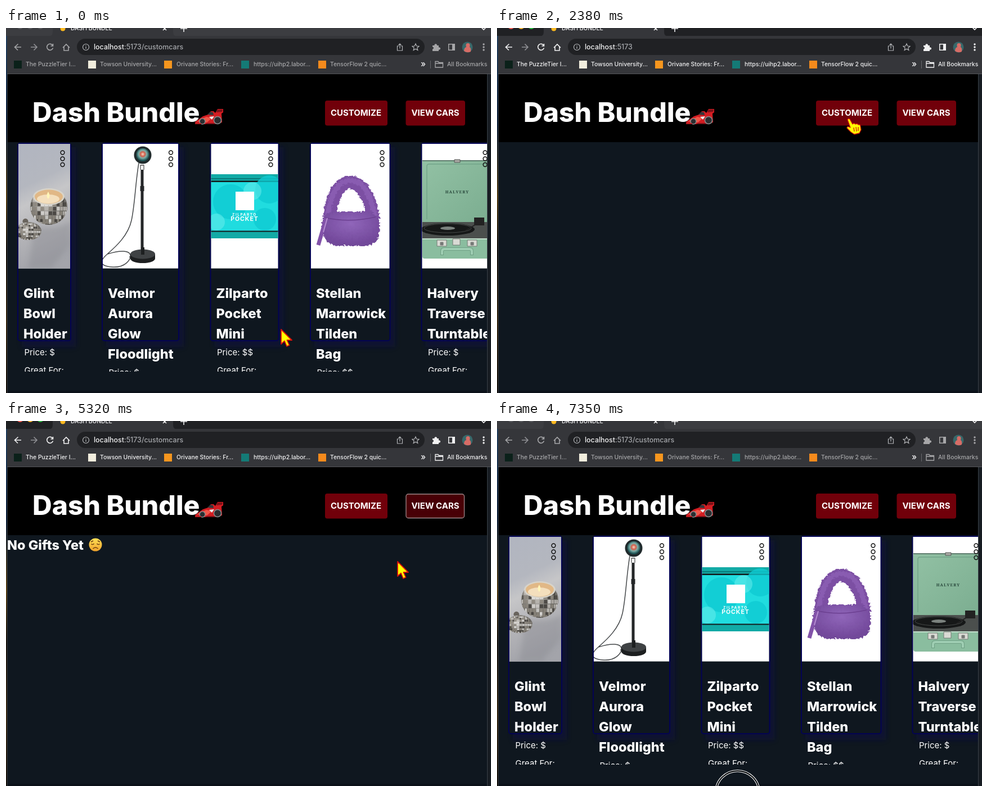
Write an HTML page that moves like this. It is 862 by 649 pixels and loops after 7420 ms.

```html
<!DOCTYPE html>
<html lang="en">
<head>
<meta charset="utf-8">
<title>Gift browser</title>
<style>
html, body { margin: 0; width: 100%; height: 100%; overflow: hidden; background: #0f171f; }
svg { display: block; width: 862px; height: 649px; }
text { white-space: pre; }
.ui { font: 500 10.4px Inter, sans-serif; fill: #f1f1f2; }
.url { font-size: 12.4px; }
.head { font: 800 23.5px Inter, sans-serif; fill: #fff; }
.title { font-size: 48px; }
.button { font: 700 15px Inter, sans-serif; fill: #fff; text-anchor: middle; }
.body { font: 15px Inter, sans-serif; fill: #fff; }
.line { fill: none; stroke: #f1f1f2; stroke-width: 1.6; }
.mid { text-anchor: middle; }
</style>
</head>
<body>
<svg id="stage" viewBox="0 0 862 649">
  <defs>
    <clipPath id="pageClip"><rect x="2" y="82" width="853" height="567"/></clipPath>
    <clipPath id="listClip"><rect x="2" y="203" width="853" height="408"/></clipPath>
    <filter id="blur" x="-30%" y="-10%" width="160%" height="120%"><feGaussianBlur stdDeviation="4"/></filter>
    <filter id="fuzz">
      <feTurbulence baseFrequency=".16" numOctaves="2" seed="4"/>
      <feDisplacementMap in="SourceGraphic" scale="6" xChannelSelector="R" yChannelSelector="G"/>
    </filter>
    <linearGradient id="desk" x2="0" y2="1">
      <stop stop-color="#24405f"/><stop offset=".25" stop-color="#10223c"/>
      <stop offset=".45" stop-color="#5a4216"/><stop offset=".6" stop-color="#171310"/>
      <stop offset=".8" stop-color="#3a2a14"/><stop offset="1" stop-color="#15110e"/>
    </linearGradient>
    <linearGradient id="wall" x2=".2" y2="1">
      <stop stop-color="#b1b5c0"/><stop offset=".35" stop-color="#b4b7bf"/>
      <stop offset=".5" stop-color="#c6c6c8"/><stop offset=".75" stop-color="#b3b3b7"/><stop offset="1" stop-color="#a3a4aa"/>
    </linearGradient>
    <radialGradient id="ball" cx=".4" cy=".35"><stop stop-color="#d9d7d2"/><stop offset="1" stop-color="#66645f"/></radialGradient>
    <radialGradient id="lens" cx=".5" cy=".45">
      <stop stop-color="#f6d9c4"/><stop offset=".35" stop-color="#d3604c"/>
      <stop offset=".6" stop-color="#7fb0aa"/><stop offset="1" stop-color="#1d5152"/>
    </radialGradient>
    <radialGradient id="fur" cx=".5" cy=".35" r=".6"><stop stop-color="#9066ba"/><stop offset="1" stop-color="#72489a"/></radialGradient>
    <linearGradient id="lid" x2="1" y2="1"><stop stop-color="#92c1a4"/><stop offset="1" stop-color="#7aac8f"/></linearGradient>
    <linearGradient id="face" x2="0" y2="1"><stop stop-color="#ffdf55"/><stop offset="1" stop-color="#f0a32c"/></linearGradient>
  </defs>

  <g id="browser">
    <rect id="frame" width="862" height="15"/>
    <path d="M75 15Q83 15 83 7V0H297V7Q297 15 305 15Z" fill="#35363a"/>
    <g id="lights"><circle cx="25" cy="-4" r="6"/><circle cx="43" cy="-4" r="6"/><circle cx="61" cy="-4" r="6"/></g>
    <circle cx="101" cy="1" r="4.5" fill="#ffb91f"/>
    <text class="ui" x="115" y="4">DASH BUNDLE</text>
    <path class="line" d="M279-2l6 6m0-6l-6 6M310 1h12m-6-6v12M845-1l4 4 4-4"/>
    <rect y="14" width="862" height="67" fill="#35363a"/>
    <rect x="126" y="19" width="618" height="29" rx="14.5" fill="#202124"/>
    <g class="dim">
      <path class="line" d="M27 34H16m5.500-5.500L15.500 34l5.500 5.500M83 31a5.500 5.500 0 1 0 .5 4.500M83.500 28v4h-4M101 35l6-6 6 6m-10-1.500V40h8v-6.500"/>
      <path d="M758 31h3.500a2.300 2.300 0 1 1 4.500 0h3v3.500a2.200 2.200 0 1 1 0 4V41h-11v-3.500a2 2 0 1 0 0-4z" fill="#f1f1f2"/>
      <path d="M786 28h12v12h-12zM787.500 29.500v9h5.500v-9z" fill="#f1f1f2" fill-rule="evenodd"/>
      <g fill="#f1f1f2"><circle cx="849" cy="29" r="1.700"/><circle cx="849" cy="34" r="1.700"/><circle cx="849" cy="39" r="1.700"/></g>
    </g>
    <path class="line" style="stroke:#909195" d="M44 34h11m-5.500-5.500l5.500 5.500-5.500 5.500"/>
    <g class="line" style="stroke:#b4b6b9;stroke-width:1.200">
      <circle cx="142" cy="34" r="5.500"/><path d="M142 33v4m0-6.500v1.200"/>
      <path d="M698 32h-2.500v8h9v-8H702m-2 4.500v-8.500m-2.500 2.500l2.500-2.500 2.500 2.500"/>
      <path d="M728 28l1.800 4 4.200.4-3.200 2.900 1 4.300-3.800-2.300-3.800 2.300 1-4.300-3.200-2.900 4.200-.4z"/>
    </g>
    <circle cx="820" cy="34" r="9.500" fill="#37686a"/>
    <path d="M814 41q0-6 4-7-2-7 3-7t3 7q3 1 2 8-6 3-12-1z" fill="#d76c66"/>
    <text class="ui url" x="156" y="38">localhost<tspan fill="#a6a8ac">:5173<tspan id="path">/customcars</tspan></tspan></text>
    <g id="bookmarks"></g>
    <rect y="81" width="862" height="1" fill="#54565a"/>
  </g>

  <rect y="82" width="862" height="567" fill="#0f171f"/>
  <rect x="2" y="82" width="853" height="121"/>
  <rect y="645" width="862" height="4" fill="#0b1119"/>
  <text class="head title" x="47" y="167">Dash Bundle</text>
  <g id="car">
    <path d="M336 167l14-10 9-3 5-6h5l3 3 4-7 10 0v6l-3 2 1 16-21 3h-26z" fill="#d31d22"/>
    <path d="M339 166l17-8 10 2-9 8z" fill="#f05649"/>
    <path d="M375 145l10 0-1 4-10 1zM357 169l16 0v2h-19z" fill="#7d1118"/>
    <path d="M358 154l5-5 5 1 1 5z" fill="#33363b"/><path d="M361 158l9-1-4 6z" fill="#eee"/>
    <g fill="#2b2d30" stroke="#898c8d" stroke-width="1.500"><circle cx="349" cy="166" r="5"/><circle cx="376" cy="164" r="6.500"/></g>
    <path d="M336 170h11" stroke="#b51c20" stroke-width="2"/>
  </g>
  <rect x="567" y="129" width="111" height="44.500" rx="4" fill="#71000a"/>
  <text class="button" x="622" y="156">CUSTOMIZE</text>
  <rect id="view" rx="4"/>
  <text class="button" x="763" y="156">VIEW CARS</text>

  <g id="empty">
    <text class="head" x="2" y="229">No Gifts Yet</text>
    <circle cx="159" cy="220" r="11.500" fill="url(#face)"/>
    <g fill="none" stroke="#6d3d12" stroke-width="1.400">
      <path d="M151.500 218.500q2.500 2.500 5-.5m5 0q2.500 3 5 .5M154.500 227q4.500-4.500 9 0M151 215l4-2m12 2l-4-2"/>
    </g>
  </g>
  <g clip-path="url(#pageClip)"><g id="cards" clip-path="url(#listClip)"></g></g>

  <rect width="2" y="14" height="635" fill="url(#desk)"/>
  <rect x="2" y="82" width="1" height="567" fill="#2b3036"/>
  <rect x="855" y="82" width="1" height="567" fill="#394047"/>
  <rect x="856" y="82" width="6" height="567" fill="#171c22"/>

  <g id="ring" fill="none" stroke="#fff" stroke-width="1.100">
    <circle r="38.300" stroke="#000" stroke-width="3" opacity=".7"/><circle r="40"/><circle r="36.800"/>
  </g>
  <g id="pointer" stroke="#d6100c" stroke-linejoin="round">
    <path id="arrow" d="M1 1V27L7 21.500 11 31 15.500 29 11.500 20H20Z" fill="#ff0" stroke-width="1.800"/>
    <g id="hand" fill="#ff0" stroke-width="1.300">
      <path d="M-5 2Q-4-1-1 1L4 10q2-3 5 0 3-2 5 1 4-1 4 3l1 6-3 6-9 2-6-4-7-7q0-4 4-2l2 1z"/>
      <path d="M6 16l1 7m3-8l1 8m3-8v7" fill="none"/>
    </g>
  </g>
</svg>
<script>
const $ = id => document.getElementById(id);
const LOOP = 7420, STEP = 70;

let seed = 7;
const random = () => (seed = seed * 16807 % 2147483647) / 2147483647;

const bookmarks = [
  [14, 35, '#0b211a', 'The PuzzleTier I...'], [146, 167, '#f1eddd', 'Towson University...'],
  [281, 303, '#f6961e', 'Orivane Stories: Fr...'], [418, 440, '#147a76', 'https://uihp2.labor...'],
  [555, 576, '#f58a1c', 'TensorFlow 2 quic...']
];
$('bookmarks').innerHTML = bookmarks.map(([x, textX, color, label]) =>
  `<rect x="${x}" y="58" width="14" height="14" fill="${color}"/>
   <text class="ui dim" x="${textX}" y="68">${label}</text>`).join('') +
  `<text class="ui" x="737" y="69" font-weight="700" style="font-size:15px">»</text>
   <rect x="754" y="58" width="1" height="14" fill="#686a6e"/>
   <g class="dim"><path class="line" style="stroke-width:1.300" d="M763 70V59.500h5l1.500 2h7V70zM763 63h13"/>
   <text class="ui" x="784" y="68">All Bookmarks</text></g>`;

// A mirror ball: facets in rows that narrow towards the rim.
function mirrorBall(id, cx, cy, rx, ry) {
  let out = '';
  for (let row = -6; row <= 6; row++) {
    const v = Math.sin(row * 0.25), half = rx * Math.sqrt(1 - v * v);
    for (let col = -7; col < 7; col++) {
      const left = half * Math.sin(col * 0.224), width = half * Math.sin((col + 1) * 0.224) - left;
      const shade = random(), light = shade < 0.2 ? 25 : shade < 0.7 ? 52 : 68 + random() * 24;
      out += `<rect x="${cx + left}" y="${cy + v * ry}" width="${width * .85}" height="${ry * .21}" fill="hsl(35 6% ${light}%)"/>`;
    }
  }
  const shape = `<ellipse cx="${cx}" cy="${cy}" rx="${rx}" ry="${ry}" fill="url(#ball)"/>`;
  return `<clipPath id="${id}">${shape}</clipPath>${shape}<g clip-path="url(#${id})" opacity=".85">${out}</g>`;
}

const candle = () => `
  <rect x="22" y="206" width="92" height="222" fill="url(#wall)"/>
  <path d="M50 352Q90 360 114 345V385L80 428H40Z" fill="#8a8b92" opacity=".4" filter="url(#blur)"/>
  ${mirrorBall('bowl', 76, 318, 33, 32)}
  <ellipse cx="76" cy="300" rx="28" ry="15" fill="#d8d4ca"/>
  <ellipse cx="76" cy="300" rx="25" ry="12.500" fill="#e1b886"/>
  <ellipse cx="75" cy="304" rx="20" ry="8" fill="#f4dfbd"/>
  <path d="M75 291q5 8 0 13-5-5 0-13z" fill="#fff5b8"/>
  ${mirrorBall('cap', 40, 361, 23, 16)}
  <path d="M30 346a5 5 0 1 1 9 0z" fill="#69645d"/>`;

const lamp = () => `
  <path d="M236 240C230 275 229 315 223 342S196 388 180 402 168 424 190 425 222 412 221 404 205 394 180 402M219 407l8 1" fill="none" stroke="#45484a" stroke-width="1.500"/>
  <path d="M239.500 252h5V400h-5zM238.500 281h7v9h-7z" fill="#242628"/>
  <path d="M239 252v-8h6v8" fill="none" stroke="#555" stroke-width="1.300"/>
  <path d="M221 402v8a22 8 0 0 0 44 0v-8z" fill="#1d1f20"/><ellipse cx="243" cy="402" rx="22" ry="8.500" fill="#3f4244"/>
  <path d="M240 390h6v13h-6z" fill="#1d1f20"/>
  <circle cx="243" cy="226" r="15.500" fill="#202a2c"/><circle cx="243" cy="225.500" r="11.500" fill="url(#lens)"/>`;

const consoleBox = () => `
  <rect x="364" y="260" width="120" height="114" fill="#12aaa6"/>
  <rect x="364" y="267" width="120" height="2" fill="#087a79"/>
  <rect x="364" y="271.500" width="120" height="91" fill="#121b1c"/>
  <rect x="364" y="274" width="120" height="86.500" fill="#20dcdf"/>
  <g fill="#0fcbd3" opacity=".8"><circle cx="399" cy="309" r="31"/><circle cx="468" cy="287" r="25"/><circle cx="460" cy="340" r="20"/></g>
  <g fill="#6eeeee" opacity=".5"><circle cx="374" cy="345" r="15"/><circle cx="438" cy="290" r="16"/></g>
  <rect x="408" y="291" width="33" height="33" fill="#fff"/>
  <g fill="#fff" font-family="Inter, sans-serif" font-weight="700" class="mid">
    <text x="424" y="334" font-size="6.500" letter-spacing="1.500">ZILPARTO</text>
    <text x="424" y="343" font-size="10.500" letter-spacing="1">POCKET</text>
  </g>`;

const bag = () => `
  <g filter="url(#fuzz)">
    <path d="M573 342C576 302 588 273 609 273S645 296 652 338" fill="none" stroke="#7b4fa3" stroke-width="23"/>
    <path d="M570 336C574 300 586 270 610 270S647 296 654 332" fill="none" stroke="#8d60b6" stroke-width="9" opacity=".8"/>
    <path d="M560 350Q559 326 582 325H642Q664 328 663 355 662 386 634 386H588Q561 384 560 350Z" fill="url(#fur)"/>
  </g>
  <path d="M566 337Q610 347 657 336" fill="none" stroke="#6b3f90" stroke-width="1.500"/>
  <path d="M569 338L555 386" stroke="#8252a9" stroke-width="7"/><path d="M571 338l-7 25" stroke="#b48dd0" stroke-width="2"/>`;

const turntable = () => `
  <rect x="740" y="235" width="125" height="118" rx="4" fill="url(#lid)"/>
  <path d="M748 340V246q0-4 4-4h110" fill="none" stroke="#73a58a" stroke-width="1.500"/>
  <path d="M740 236h122" stroke="#5f7d6e" stroke-width="2"/>
  <path d="M797 239v-5h10v5z" fill="#a9a9a4" stroke="#555"/>
  <text class="mid" x="802" y="294" font-family="Noto Serif, serif" font-weight="800" font-size="7" letter-spacing="1.200" fill="#29483c">HALVERY</text>
  <path d="M740 345h122v30H740z" fill="#4b4f4d"/>
  <ellipse cx="785" cy="358" rx="48" ry="11" fill="#161818"/><ellipse cx="785" cy="356" rx="42" ry="8" fill="none" stroke="#454847"/>
  <ellipse cx="785" cy="356" rx="13" ry="3" fill="#7b827e"/>
  <path d="M833 338h16v12h-16zM837 348l-20 12" fill="#222" stroke="#222" stroke-width="2"/>
  <path d="M740 374h122v32q0 4-4 4H744q-4 0-4-4z" fill="#8abd9f"/>
  <path d="M740 375h122" stroke="#c0decb" stroke-width="2"/>
  <g fill="#d9dad4" stroke="#747a74"><path d="M766 377h17v11h-17zM820 377h17v11h-17zM794 375h13v11h-13z"/><path d="M772 381h5v5h-5zM826 381h5v5h-5z" fill="#777"/></g>
  <path d="M775 404v-7q0-4 4-4h45q4 0 4 4v7" fill="none" stroke="#6e9f84" stroke-width="6"/>
  <path d="M775 403v-6q0-4 4-4h45q4 0 4 4v6" fill="none" stroke="#9fceb3" stroke-width="4"/>`;

const gifts = [
  { x: 20, width: 96, dots: 100.5, price: '$', name: 'Glint Bowl Holder', photo: candle },
  { x: 170, width: 138, dots: 293, price: '$', name: 'Velmor Aurora Glow Floodlight', photo: lamp },
  { x: 362.5, width: 123, dots: 470.5, price: '$$', name: 'Zilparto Pocket Mini', photo: consoleBox },
  { x: 540, width: 143.500, dots: 668.5, price: '$$', name: 'Stellan Marrowick Tilden Bag', photo: bag },
  { x: 737.5, width: 134, dots: 851.5, price: '$', name: 'Halvery Traverse Turntable', photo: turntable }
];

function card({ x, width, dots, price, name, photo }, index) {
  const words = name.split(' '), baseline = 582 + (words.length - 3) * 36;
  const inner = `x="${x + 2}" y="206" width="${width - 4}" height="221.500"`;
  return `<clipPath id="photo${index}"><rect ${inner}/></clipPath>
    <rect x="${x + 8}" y="212" width="${width}" height="355" fill="#0b1146" opacity=".5" filter="url(#blur)"/>
    <rect x="${x + 1}" y="205" width="${width - 2}" height="351" rx="4" fill="#0f171f" stroke="#030353" stroke-width="2"/>
    <rect ${inner} fill="#fff"/>
    <g clip-path="url(#photo${index})">${photo()}</g>
    <g fill="none" stroke="#111" stroke-width="1.500">${[221.5, 232.5, 243].map(y => `<circle cx="${dots}" cy="${y}" r="3.400"/>`).join('')}</g>
    ${words.map((word, i) => `<text class="head" x="${x + 11}" y="${480 + i * 36}">${word}</text>`).join('')}
    <text class="body" x="${x + 12.5}" y="${baseline}">Price: ${price}</text>
    <text class="body" x="${x + 12.5}" y="${baseline + 32}">Great For:</text>`;
}
$('cards').innerHTML = gifts.map(card).join('');

// Pointer stops: time, x, y.
const route = [
  [0, 488, 535], [280, 493, 513], [420, 493, 513], [560, 505, 480], [840, 600, 350], [1050, 664, 262],
  [1190, 675, 230], [1330, 637, 161], [1400, 633, 157], [1610, 633, 157], [1820, 628, 161],
  [2660, 628, 161], [2940, 602, 235], [3220, 562, 370], [3430, 551, 410], [3640, 551, 422],
  [3710, 551, 428], [3780, 551, 428], [4060, 600, 350], [4340, 705, 220], [4550, 752, 170],
  [4760, 756, 162], [5040, 756, 162], [5320, 695, 249], [5600, 600, 390], [5740, 566, 432],
  [5950, 561, 437], [6230, 561, 437], [6720, 500, 651], [7350, 431, 664], [LOOP, 431, 664]
];
const clicks = [1400, 2100, 4900, 7350];

function pointerAt(time) {
  const next = route.findIndex(stop => stop[0] > time);
  const [t0, x0, y0] = route[next - 1], [t1, x1, y1] = route[next];
  const part = (time - t0) / (t1 - t0);
  return [x0 + (x1 - x0) * part, y0 + (y1 - y0) * part];
}

const set = (node, values) => { for (const key in values) node.setAttribute(key, values[key]); };
const show = (id, visible) => $(id).style.display = visible ? '' : 'none';
const dimmed = document.querySelectorAll('.dim'), lights = [...$('lights').children];

function draw(time) {
  const active = time >= 1400 && time < 7350;
  set($('frame'), { fill: active ? '#202124' : '#3c3d41' });
  lights.forEach((light, i) => set(light, { fill: active ? ['#ff5f57', '#febc2e', '#28c840'][i] : '#5b5c60' }));
  dimmed.forEach(node => set(node, { opacity: active ? 1 : 0.6 }));

  const home = time >= 2240 && time < 4970, waiting = time >= 4970 && time < 5460;
  show('path', !home);
  show('empty', waiting);
  show('cards', !home && !waiting);
  set($('view'), time >= 4480 && time < 5460
    ? { x: 711, y: 130, width: 103.5, height: 42.5, fill: '#480006', stroke: '#a0898b', 'stroke-width': 1.3 }
    : { x: 710.5, y: 129, width: 105.5, height: 44.5, fill: '#71000a', stroke: 'none' });

  const [x, y] = pointerAt(time);
  const overButton = y > 129 && y < 173 && (x > 567 && x < 678 || x > 710 && x < 816);
  const hand = overButton && time >= 1680;
  set($('pointer'), { transform: `translate(${x} ${y})` });
  show('hand', hand);
  show('arrow', !hand);

  const click = clicks.find(start => time >= start && time < start + 210);
  show('ring', click !== undefined);
  set($('ring'), { transform: `translate(${x - 3.5} ${y - 3.5})`, opacity: time - click >= 140 ? 0.5 : 1 });
}

function tick() {
  const time = performance.now() % LOOP;
  draw(Math.floor(time / STEP) * STEP);
  requestAnimationFrame(tick);
}
tick();
</script>
</body>
</html>
```
